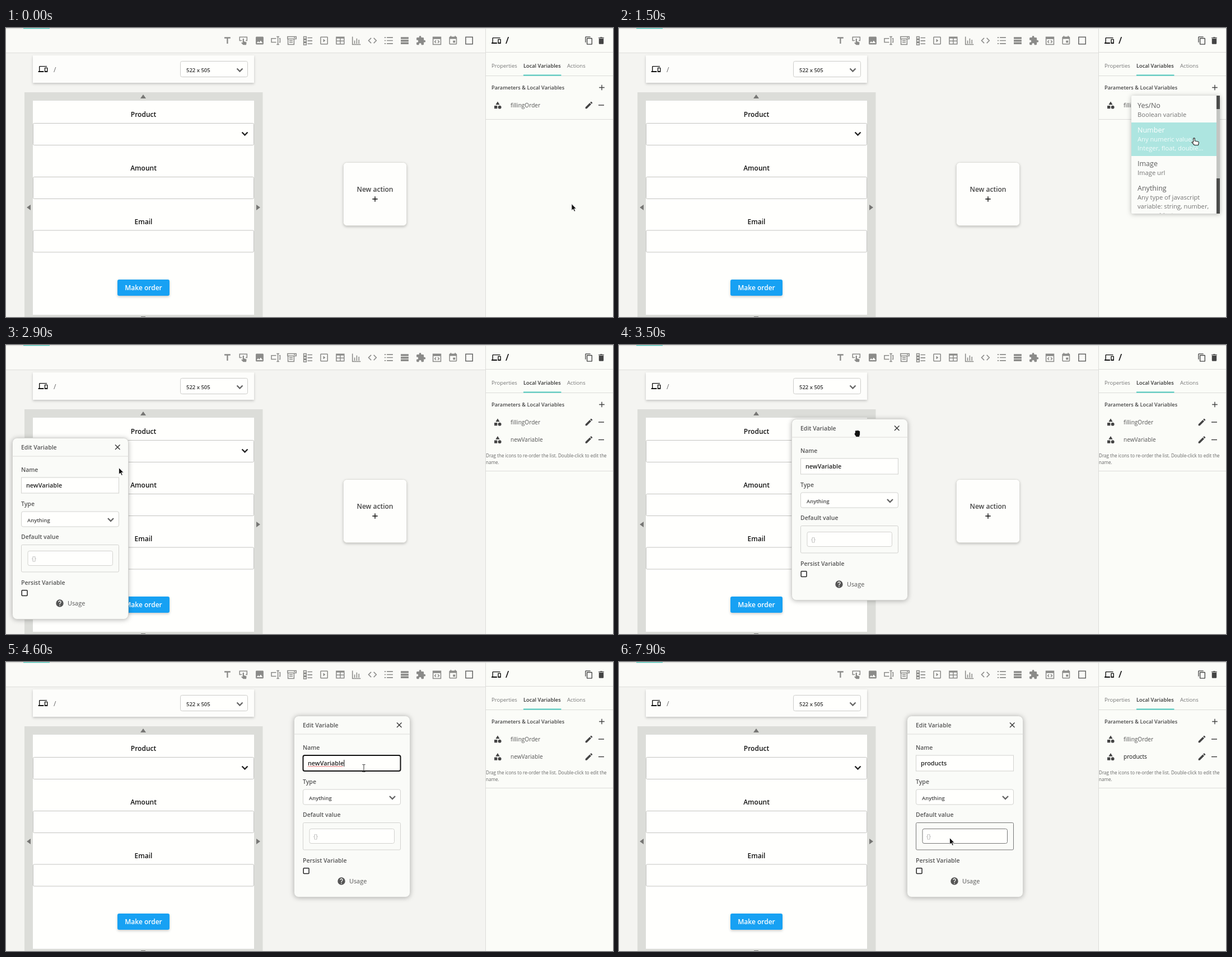
These frames come from a looping animation (1084x517 px, 8000 ms). An HTML page:

```html
<!DOCTYPE html>
<html lang="en">
<head>
<meta charset="utf-8">
<title>Edit variable</title>
<style>
html, body { margin: 0; width: 100%; height: 100%; overflow: hidden; background: #f4f4f1; }
svg { display: block; width: 1084px; height: 517px; font-family: "Open Sans", "Noto Sans", sans-serif; }
text { white-space: pre; }
.card { filter: drop-shadow(0 2px 2px rgba(0,0,0,.2)); }
.float { filter: drop-shadow(0 1px 4px rgba(0,0,0,.28)); }
</style>
</head>
<body>
<svg id="stage" viewBox="0 0 1084 517"></svg>
<script>
const LOOP = 8000, STEP = 100;

// Icons live in a 24 unit box. Those in LINES are stroked, the rest filled.
const ICONS = {
  title: 'M5 4v3h5.5v12h3V7H19V4z',
  press: 'M2 13V3h19v10h-4v-2h2V5H4v6h4v2zM10 8.500a1.500 1.500 0 0 1 3 0V14l5 1.500q1.200.500 1 1.500l-.8 5h-7l-4.500-4.500 1.200-1.200 2.100 1z',
  image: 'M21 19V5c0-1.100-.9-2-2-2H5c-1.100 0-2 .9-2 2v14c0 1.100.9 2 2 2h14c1.100 0 2-.9 2-2zM8.500 13.500l2.500 3 3.500-4.500 4.500 6H5z',
  input: 'M13 7H2v9h11M14 3h6M17 3v18M14 21h6M20 7h2v9h-2',
  form: 'M2 3h20v5H2zM3 8v13h14V8M6 12h8M6 16h8M17 5h2',
  checks: 'M2 3h6v5H2zM2 10h6v5H2zM2 17h6v5H2zM11 5.500h11M11 12.500h11M11 19.500h11',
  play: 'M10 8v8l5-4zM19 3H5c-1.100 0-2 .9-2 2v14c0 1.100.9 2 2 2h14c1.100 0 2-.9 2-2V5c0-1.100-.9-2-2-2zm0 16H5V5h14z',
  table: 'M3 4h18v16H3zM3 6h18M3 13h18M12 5v15',
  chart: 'M3 3v18h19M8 12v7M13 7v12M18 10v9',
  code: 'M9 6l-6 6 6 6M15 6l6 6-6 6',
  list: 'M2.500 5h3M2.500 12h3M2.500 19h3M8 5h14M8 12h14M8 19h14',
  rows: 'M3 4h18v4.500H3zM3 10h18v4.500H3zM3 16h18v4.500H3z',
  puzzle: 'M20.500 11H19V7c0-1.100-.9-2-2-2h-4V3.500a2.500 2.500 0 0 0-5 0V5H4c-1.100 0-2 .9-2 2v3.800h1.500a2.700 2.700 0 0 1 0 5.400H2V20c0 1.100.9 2 2 2h3.800v-1.500a2.700 2.700 0 0 1 5.400 0V22H17c1.100 0 2-.9 2-2v-4h1.500a2.500 2.500 0 0 0 0-5z',
  embed: 'M3 4h18v17H3zM3 6h18M3 7.500h18M10 11.500l-3 3 3 3M14 11.500l3 3-3 3',
  event: 'M17 12h-5v5h5zM16 1v2H8V1H6v2H5c-1.100 0-2 .9-2 2v14c0 1.100.9 2 2 2h14c1.100 0 2-.9 2-2V5c0-1.100-.9-2-2-2h-1V1zm3 18H5V8h14z',
  square: 'M4 4h16v16H4z',
  devices: 'M4 6h18V4H4c-1.100 0-2 .9-2 2v11H0v3h14v-3H4zM23 8h-6c-.55 0-1 .45-1 1v10c0 .55.45 1 1 1h6c.55 0 1-.45 1-1V9c0-.55-.45-1-1-1zm-1 9h-4v-7h4z',
  copy: 'M16 1H4c-1.100 0-2 .9-2 2v14h2V3h12zM19 5H8c-1.100 0-2 .9-2 2v14c0 1.100.9 2 2 2h11c1.100 0 2-.9 2-2V7c0-1.100-.9-2-2-2zm0 16H8V7h11z',
  trash: 'M6 19c0 1.100.9 2 2 2h8c1.100 0 2-.9 2-2V7H6zM19 4h-3.500l-1-1h-5l-1 1H5v2h14z',
  shapes: 'M12 2l-5.500 9h11zM3 13.500h8v8H3zM13 17.500a4.500 4.500 0 1 0 9 0a4.500 4.500 0 1 0-9 0z',
  pencil: 'M3 17.250V21h3.750L17.800 9.950 14.050 6.200zM20.700 7c.4-.4.4-1 0-1.400l-2.300-2.300c-.4-.4-1-.4-1.400 0l-1.900 1.800 3.750 3.750z',
  help: 'M12 2a10 10 0 1 0 0 20a10 10 0 1 0 0-20zm1 17h-2v-2h2zm2.070-7.750l-.9.920C13.450 12.900 13 13.500 13 15h-2v-.5c0-1.100.45-2.100 1.170-2.830l1.240-1.260A2 2 0 1 0 10 9H8a4 4 0 1 1 7.070 2.250z'
};
const LINES = ['input', 'form', 'checks', 'table', 'chart', 'code', 'list', 'embed', 'square'];
const TOOLS = ['title', 'press', 'image', 'input', 'form', 'checks', 'play', 'table', 'chart',
  'code', 'list', 'rows', 'puzzle', 'embed', 'event', 'square'];

const icon = (name, x, y, color, scale = .7) => {
  const paint = LINES.includes(name) ? `fill="none" stroke="${color}" stroke-width="2"` : `fill="${color}" fill-rule="evenodd"`;
  return `<path d="${ICONS[name]}" ${paint} transform="translate(${x} ${y}) scale(${scale}) translate(-12 -12)"/>`;
};
const text = (x, y, size, str, color = '#555', extra = '') =>
  `<text x="${x}" y="${y}" font-size="${size}" fill="${color}" ${extra}>${str}</text>`;
const rect = (x, y, w, h, fill, extra = '') =>
  `<rect x="${x}" y="${y}" width="${w}" height="${h}" fill="${fill}" ${extra}/>`;
const line = (d, color, width = 1) => `<path d="${d}" fill="none" stroke="${color}" stroke-width="${width}"/>`;
const chevron = (x, y, color) => line(`M${x - 5} ${y - 2.5}l5 5 5-5`, color, 2.4);
const plus = (x, y, r, color) => line(`M${x - r} ${y}h${2 * r}M${x} ${y - r}v${2 * r}`, color, 1.4);
const BOLD = 'font-weight="600"', MID = BOLD + ' text-anchor="middle"';

const toolbar = rect(0, 0, 856, 44, '#fafaf7') + rect(0, 0, 1084, 1.5, '#dededb') + rect(31, 0, 47, 1.3, '#4cc9bd') +
  line('M0 44.500H856', '#dededb') +
  TOOLS.map((name, i) => icon(name, 395.4 + i * 28.78, 22.5, name === 'square' ? '#666' : '#8b8b89', .77)).join('');

const field = (label, y) => text(245.5, y - 11, 12, label, '#111', MID) +
  rect(48.5, y + .5, 394, 39, '#fffffd', 'rx="2" stroke="#c4c4c1"');

const canvas = rect(48, 49, 395, 49, '#fdfdfb', 'class="card"') +
  icon('devices', 66, 73.5, '#111') + text(85, 79, 12, '/', '#666') +
  rect(311.5, 59.5, 120, 28, '#fffffd', 'rx="3" stroke="#ccccc9"') +
  text(322, 79, 9.5, '522 x 505', '#333', BOLD) + chevron(417.5, 75, '#666') +
  rect(33, 115, 425.5, 402, '#dcddd9') + rect(48, 130, 395, 383, '#fffffd') +
  '<path fill="#777775" d="M240 126h10l-5-7zM44 316v10l-7-5zM447 316v10l7-5zM241 516h8v1h-8z"/>' +
  field('Product', 170) + chevron(426.5, 189, '#222') + field('Amount', 266) + field('Email', 361.5) +
  rect(199, 450, 93, 29, '#17a1f3', 'rx="3" class="card"') + text(245.5, 469, 12, 'Make order', '#fff', MID) +
  rect(602.5, 240.5, 113, 113, '#fefefc', 'rx="6" stroke="#deded9" class="card"') +
  text(659, 293, 12, 'New action', '#444', MID) + plus(659, 306, 4.7, '#111');

const row = (y, label, id) => icon('shapes', 878, y, '#444', .66) +
  text(901, y + 3.5, 10.1, label, '#555', `id="${id}"`) +
  icon('pencil', 1041, y, '#444') + line(`M1058 ${y}h10`, '#444', 1.5);

const sidebar = rect(856, 1.5, 228, 516, '#fbfcf8') + line('M856.500 1V517M856 43.500H1084M856 85.500H1084', '#dcdcd9') +
  icon('devices', 875.5, 22.5, '#111') + text(892, 28, 16, '/', '#111', BOLD) +
  icon('copy', 1041, 22.5, '#444', .67) + icon('trash', 1063, 22.5, '#444') +
  text(867, 70.5, 9.5, 'Properties', '#777') + text(924, 70.5, 9.25, 'Local Variables', '#333', BOLD) +
  text(1002, 70.5, 9.6, 'Actions', '#777') + rect(924, 83.5, 67.5, 2, '#4cc9bd') +
  text(867, 109.5, 9.25, 'Parameters &amp; Local Variables', '#444', BOLD) + plus(1064, 106.5, 4.8, '#444') +
  row(138, 'fillingOrder', 'firstRow') + line('M857 163.500H1084', '#dcdcd9') +
  `<g id="added">${rect(857, 161, 227, 4, '#fbfcf8') + row(169.5, 'newVariable', 'rowName') +
    text(857, 201, 8.1, 'Drag the icons to re-order the list. Double-click to edit the', '#666') +
    text(857, 213, 8.1, 'name.', '#666') + line('M857 225.500H1084', '#dcdcd9')}</g>`;

const option = (y, title, ...notes) => `<g class="option">${text(926, y, 12.5, title, 'inherit') +
  notes.map((note, i) => text(926, y + 16 * (i + 1), 11.2, note, 'inherit', 'opacity=".85"')).join('')}</g>`;
const menu = `<clipPath id="menuClip">${rect(915, 121, 158, 211, '#000')}</clipPath><g id="menu" class="float">` +
  rect(915, 121, 158, 211, '#fbfcf9', 'rx="2"') + '<g clip-path="url(#menuClip)">' +
  rect(915, 0, 153, 60, '#ade5e0', 'id="hover"') +
  option(143, 'Yes/No', 'Boolean variable') +
  option(187, 'Number', 'Any numeric value,', 'Integer, float, double...') +
  option(247, 'Image', 'Image url') +
  option(291, 'Anything', 'Any type of javascript', 'variable: string, number,', 'array, object') +
  rect(1067, 121, 6, 211, '#4b4c4b') + rect(1067, 145, 6, 124, '#c3c5c2') + '</g></g>';

const outline = id => `id="${id}" stroke="#d2d2cf"`;
const label = (x, y, str) => text(x, y, 10.5, str, '#555', BOLD);
const panel = `<g id="panel">${rect(0, 0, 207, 324, '#fafbf8', 'rx="8" stroke="#d4d4d1" class="float"') +
  label(15.5, 20, 'Edit Variable') + line('M183.500 12l8.500 8.500M192 12l-8.500 8.500', '#333', 1.4) +
  line('M0 32.500H207', '#dcdcd9') +
  label(15.5, 60, 'Name') + rect(16, 70.5, 174, 28, '#fffffd', outline('nameBox')) +
  rect(24, 78.5, 66, 13, '#b5d5ff', 'id="selection"') + text(24.5, 88, 10.8, '', '#222', `id="nameText" ${BOLD}`) +
  `<path id="squiggle" fill="none" stroke="#e0484d" stroke-width=".9" d="M24.500 91${'l1.500-1.500 1.500 1.500'.repeat(21)}"/>` +
  rect(0, 78.5, 1, 12, '#111', 'id="caret"') +
  label(15.5, 121.5, 'Type') + rect(16, 131.5, 174, 27, '#fffffd', 'rx="3" stroke="#d2d2cf"') +
  text(26.5, 150, 9.4, 'Anything', '#444', BOLD) + chevron(175.5, 146, '#666') +
  label(15.5, 180.5, 'Default value') + rect(16, 191, 174, 48.5, '#fafbf8', 'rx="2" ' + outline('outerBox')) +
  rect(27.5, 202, 151.5, 26, '#fffffd', 'rx="3" ' + outline('innerBox')) + text(34.5, 219, 10.5, '{}', '#aaa') +
  label(15.5, 262, 'Persist Variable') +
  rect(16.7, 272.2, 9.8, 9.8, '#fff', 'rx="1" stroke="#222" stroke-width="1.5"') +
  icon('help', 84.5, 295.5, '#555', .67) + text(98.5, 299, 10.9, 'Usage', '#555')}</g>`;

// Each pointer is drawn around its hot spot.
const cursors = `<g id="cursor" stroke-linejoin="round">
  <path id="arrow" fill="#111" stroke="#fff" stroke-width=".8" d="M0 0v12l2.800-2.500 2 4.300 2-.9-2-4.200h3.700z"/>
  <path id="finger" fill="#fff" stroke="#222" stroke-width="1.100" d="M-1.300.5q1.300-1.200 2.600 0V5l6 1.300q1.300.5 1.100 2L7.400 12.500H.6L-4 7.700q.5-1.700 2.700-.4z"/>
  <path id="fist" fill="#111" stroke="#fff" stroke-width=".7" d="M-4-4q1-2 2.300-.8 1.200-1.500 2.400-.2 1.500-1 2.300.5 2-.5 2 1.500V2L3.500 6.500H-2L-5 2Q-6-1-4-.5z"/>
  <path id="beam" fill="none" stroke="#333" stroke-width="1" d="M-2.500-6.500h2l.5.5.5-.5h2M0-6V6M-2.500 6.500h2L0 6l.5.5h2"/>
</g>`;

const stage = document.getElementById('stage');
stage.innerHTML = toolbar + canvas + sidebar + menu + panel + cursors;
const $ = id => document.getElementById(id);
const show = (id, on) => $(id).setAttribute('visibility', on ? 'visible' : 'hidden');
const set = (id, attrs) => { for (const key in attrs) $(id).setAttribute(key, attrs[key]); };
const progress = (t, from, to) => Math.min(1, Math.max(0, (t - from) / (to - from)));
const smooth = u => u * u * (3 - 2 * u);

// Pointer moves: start, end, x, y
const MOVES = [
  [0, 400, 1040, 186], [500, 800, 1064, 104], [1300, 1500, 1027, 197], [1500, 1800, 1015, 300],
  [2400, 2900, 201.5, 219.5], [3000, 3300, 128.5, 192],
  [3900, 4100, 638, 140], [4200, 4400, 639, 189], [4500, 4600, 639, 190], [7000, 7800, 590.5, 314.5]
];
const DRAG = { from: 3300, to: 3900, x: 503, y: -70 };
const KEYS = [5400, 5600, 5700, 5900, 6100, 6200, 6400, 6700];
const OPTION_TOPS = [125, 169, 229, 273, 333];

function dragOffset(t) {
  const rest = 1 - progress(t, DRAG.from, DRAG.to);
  return [DRAG.x * (1 - rest ** 2.2), DRAG.y * (1 - rest ** 1.63)].map(Math.round);
}

function pointerAt(t) {
  let x = 1010, y = 314.5, dragged = false;
  for (const [from, to, nx, ny] of MOVES) {
    if (!dragged && from >= DRAG.to) { x += DRAG.x; y += DRAG.y; dragged = true; }
    if (t <= from) break;
    const u = smooth(progress(t, from, to));
    x += (nx - x) * u;
    y += (ny - y) * u;
  }
  if (t > DRAG.from && t <= DRAG.to) {
    const [dx, dy] = dragOffset(t);
    return [128.5 + dx, 192 + dy];
  }
  return [x, y];
}

function pointerShape(t) {
  if (t >= 3300 && t < 4000) return 'fist';
  if (t >= 4400 && t < 7200) return 'beam';
  return t >= 800 && t < 2500 ? 'finger' : 'arrow';
}

function render(time) {
  const t = Math.floor(time / STEP) * STEP;
  const [x, y] = pointerAt(t);
  const shape = pointerShape(t);
  set('cursor', { transform: `translate(${x} ${y})` });
  ['arrow', 'finger', 'fist', 'beam'].forEach(id => show(id, id === shape));

  show('menu', t >= 900 && t < 2500);
  set('menu', { opacity: t < 1000 ? .6 : 1 });
  const active = y < 121 ? -1 : OPTION_TOPS.findIndex((top, i) => y >= top && y < OPTION_TOPS[i + 1]);
  if (active >= 0) set('hover', { y: OPTION_TOPS[active], height: OPTION_TOPS[active + 1] - OPTION_TOPS[active] });
  set('hover', { opacity: active < 0 ? 0 : 1 });
  document.querySelectorAll('.option').forEach((node, i) => node.setAttribute('fill', i === active ? '#fff' : '#5c5c5c'));

  const opened = t >= 2000, focused = t >= 4400 && t < 7400, saved = t >= 7400;
  const [dx, dy] = dragOffset(t);
  set('panel', { transform: `translate(${11.5 + dx} ${166.5 + dy})`, display: opened ? 'inline' : 'none' });
  set('added', { display: opened ? 'inline' : 'none' });

  const typed = KEYS.filter(at => t >= at).length;
  $('nameText').textContent = typed ? 'products'.slice(0, typed) : 'newVariable';
  $('rowName').textContent = saved ? 'products' : 'newVariable';
  set('rowName', { fill: saved ? '#111' : '#555' });
  const selected = t >= 5100 && t < 5400;
  set('selection', { opacity: selected ? 1 : 0 });
  set('squiggle', { opacity: focused && t < 5100 ? 1 : 0 });
  set('caret', { opacity: focused && !selected ? 1 : 0, x: 24.5 + (opened ? $('nameText').getComputedTextLength() : 0) });

  const hovered = t >= 4100 && t < 4400;
  set('nameBox', { stroke: focused ? '#111' : hovered ? '#777' : '#d2d2cf', 'stroke-width': focused ? 2 : 1, rx: focused ? 3 : 0 });
  const edge = saved && y > 287 ? '#777' : '#d2d2cf';
  set('outerBox', { stroke: edge });
  set('innerBox', { stroke: edge });
}

const start = performance.now();
function tick() {
  render((performance.now() - start) % LOOP);
  requestAnimationFrame(tick);
}
tick();
</script>
</body>
</html>
```
